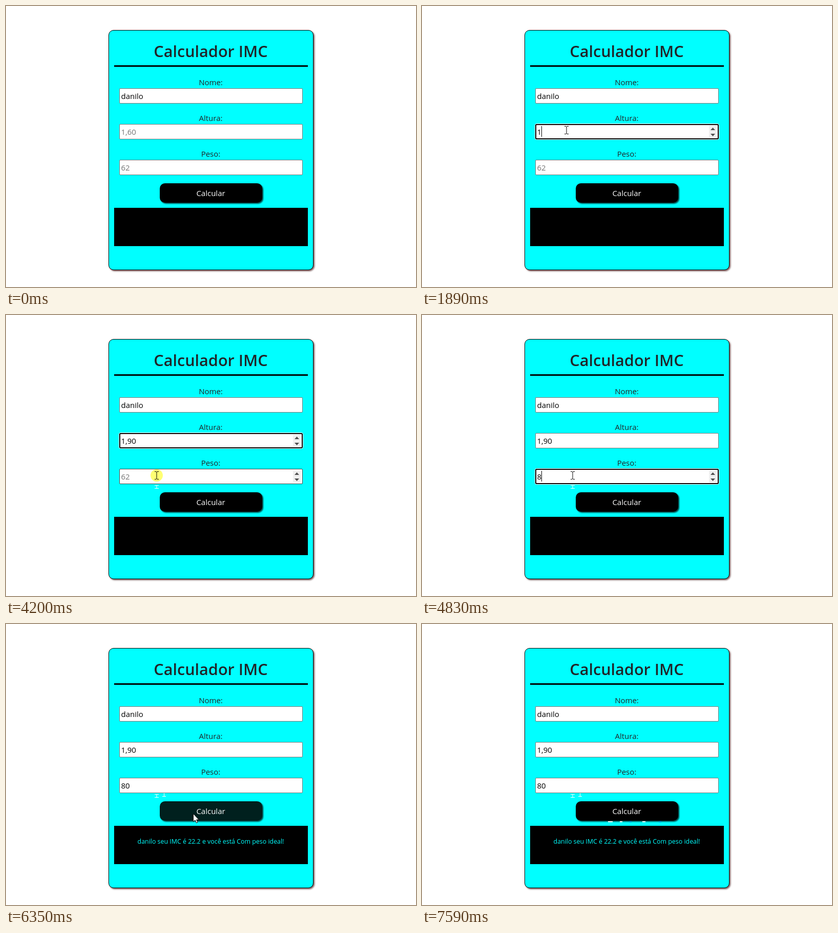
An HTML page that plays this animation: 800x550 px, repeating every 8.19 s.

```html
<!DOCTYPE html>
<html lang="pt-BR">
<head>
<meta charset="utf-8">
<title>Calculador IMC</title>
<style>
  html, body { margin: 0; width: 100%; height: 100%; overflow: hidden; background: #fff }
  svg { display: block; font: 15px "Open Sans", "Noto Sans", sans-serif }
  .mid { text-anchor: middle; fill: #212529 }
  .box { fill: #fff; stroke: #767676 }
  .box.hover { stroke: #444 }
  .ring, .line { fill: none }
</style>
</head>
<body>
<svg width="800" height="550" viewBox="0 0 800 550">
  <rect x="200.5" y="47.5" width="399" height="469" rx="9.5" fill="#0ff" stroke="#000"
        style="filter:drop-shadow(2px 2px 1.5px #300a)"/>
  <text class="mid" x="399.5" y="100" font-size="30.6" font-weight="600">Calculador IMC</text>
  <path d="M211 116h378v3h-378z"/>
  <g id="fields"></g>
  <g id="trail" class="line" stroke="#fff">
    <path d="M290 333.5h8M290 339.5h8M294 333v6"/>
    <path d="M305 337.5h7M308.5 331v6"/>
  </g>
  <rect id="button" x="300" y="347" width="200" height="38" rx="10"
        style="filter:drop-shadow(2px 2px 1px #000b)"/>
  <text class="mid" x="399.5" y="372" style="fill:#fff">Calcular</text>
  <g id="smear" class="line" stroke-width="2">
    <path stroke="#fff" d="M363 387h9M386 387h5M430 387h6"/>
    <path stroke="#08c" d="M404 387h5M462 387h5"/>
  </g>
  <path d="M211 395h378v75h-378z"/>
  <text id="result" class="mid" x="399.5" y="430" font-size="12.4" style="fill:#0ff">danilo seu IMC é 22.2 e você está Com peso ideal!</text>
  <g id="pointer">
    <circle id="click" r="12" fill="#ff0" opacity=".55"/>
    <path id="beam" class="line" stroke="#000" d="M-4 -7.5h3l1 1l1 -1h3M-4 7.5h3l1 -1l1 1h3M0 -7v14"/>
    <path id="arrow" fill="#fff" stroke="#111" d="M.5 .5V16L4 12.8L6.5 18.3L9 17.2L6.6 12H11.3Z"/>
  </g>
</svg>
<script>
const LOOP = 8190, TICK = 70;
const $ = id => document.getElementById(id);
const show = (el, on) => el.setAttribute('visibility', on ? 'visible' : 'hidden');
const during = (t, from, to) => t >= from && t < to;
const ramp = (t, from, to) => Math.min(1, Math.max(0, (t - from) / (to - from)));

// time, altura, peso, focused field, caret shown
const states = [
  [0, '', '', 0, 0], [1230, '', '', 1, 1], [1690, '', '', 1, 0],
  [1890, '1', '', 1, 1], [2420, '1', '', 1, 0],
  [2620, '1,', '', 1, 1], [3170, '1,', '', 1, 0],
  [3240, '1,9', '', 1, 1], [3450, '1,90', '', 1, 1], [3930, '1,90', '', 1, 0],
  [4270, '1,90', '', 2, 1], [4760, '1,90', '', 2, 0],
  [4830, '1,90', '8', 2, 1], [5100, '1,90', '80', 2, 1], [5650, '1,90', '80', 2, 0],
  [5860, '1,90', '80', 0, 0]
];

// pointer stops: time, x, y
const stops = [
  [310, 668, 505], [660, 425, 345], [1020, 282, 243], [3520, 282, 243],
  [3930, 293, 330], [4000, 293, 353], [4200, 294, 314], [5170, 294, 314],
  [5650, 362, 371], [6150, 362, 371], [6350, 365, 371], [6550, 364, 370],
  [6750, 364, 370], [7030, 468, 380], [7520, 763, 534], [7590, 763, 534]
];

const fields = [['Nome:', ''], ['Altura:', '1,60'], ['Peso:', '62']].map(([label, hint], i) => {
  const g = document.createElementNS('http://www.w3.org/2000/svg', 'g'), y = 161 + 70 * i;
  g.setAttribute('transform', `translate(0 ${y})`);
  g.innerHTML = `<text class="mid" x="399.5" y="-6">${label}</text>
    <rect class="box" x="221.5" y=".5" width="357" height="29" rx="1.5"/>
    <g class="ring"><rect x="220.5" y="-.5" width="359" height="31" rx="3" stroke="#fff"/>
      <rect x="222" y="1" width="356" height="28" rx="2" stroke="#000" stroke-width="2"/></g>
    <g class="spin"><path fill="#f0f0f0" d="M560 3h15v24h-15z"/>
      <path fill="#505050" d="M563 12h9l-4.5 -5zM563 19h9l-4.5 5z"/></g>
    <text class="value" x="224.5" y="21"></text>
    <path class="caret" d="M0 4h1v21h-1z"/>`;
  $('fields').append(g);
  const part = name => g.querySelector('.' + name);
  return { y, hint, box: part('box'), ring: part('ring'), spin: part('spin'),
           value: part('value'), caret: part('caret') };
});

function pointerAt(t) {
  const i = stops.findLastIndex(s => s[0] <= t);
  if (i < 0 || i === stops.length - 1) return null;
  const [t0, x0, y0] = stops[i], [t1, x1, y1] = stops[i + 1];
  const k = Math.floor((t - t0) / TICK) * TICK / (t1 - t0);
  return [x0 + (x1 - x0) * k, y0 + (y1 - y0) * k].map(Math.round);
}

function draw(t) {
  const [, altura, peso, focus, caretOn] = states.findLast(s => s[0] <= t);
  const pointer = pointerAt(t);
  const [px, py] = pointer || [-99, -99];
  let inField = false;

  fields.forEach((f, i) => {
    const text = ['danilo', altura, peso][i];
    const hover = during(px, 221, 579) && during(py, f.y, f.y + 30);
    inField ||= hover;
    f.value.textContent = text || f.hint;
    f.value.setAttribute('fill', text ? '#000' : '#757575');
    f.box.classList.toggle('hover', hover);
    show(f.ring, focus === i && i);
    show(f.spin, i && (hover || focus === i));
    show(f.caret, caretOn && focus === i);
    const width = text ? f.value.getComputedTextLength() : 0;
    f.caret.setAttribute('transform', `translate(${Math.floor(225 + width)} 0)`);
  });

  const glow = ramp(t, 5550, 5820) - ramp(t, 7030, 7240);
  $('button').setAttribute('fill', `rgb(0 ${Math.round(32 * glow)} ${Math.round(30 * glow)})`);
  show($('result'), t >= 5930);
  show($('trail').children[0], t >= 4000);
  show($('trail').children[1], t >= 5310);
  show($('smear'), t >= 7100);

  $('pointer').setAttribute('transform', `translate(${px} ${py})`);
  show($('click'), [1160, 4200, 5790].some(c => during(t, c, c + TICK)));
  show($('beam'), pointer && inField);
  show($('arrow'), pointer && !inField);
}

const start = performance.now();
function frame() {
  draw((performance.now() - start) % LOOP);
  requestAnimationFrame(frame);
}
frame();
</script>
</body>
</html>
```
